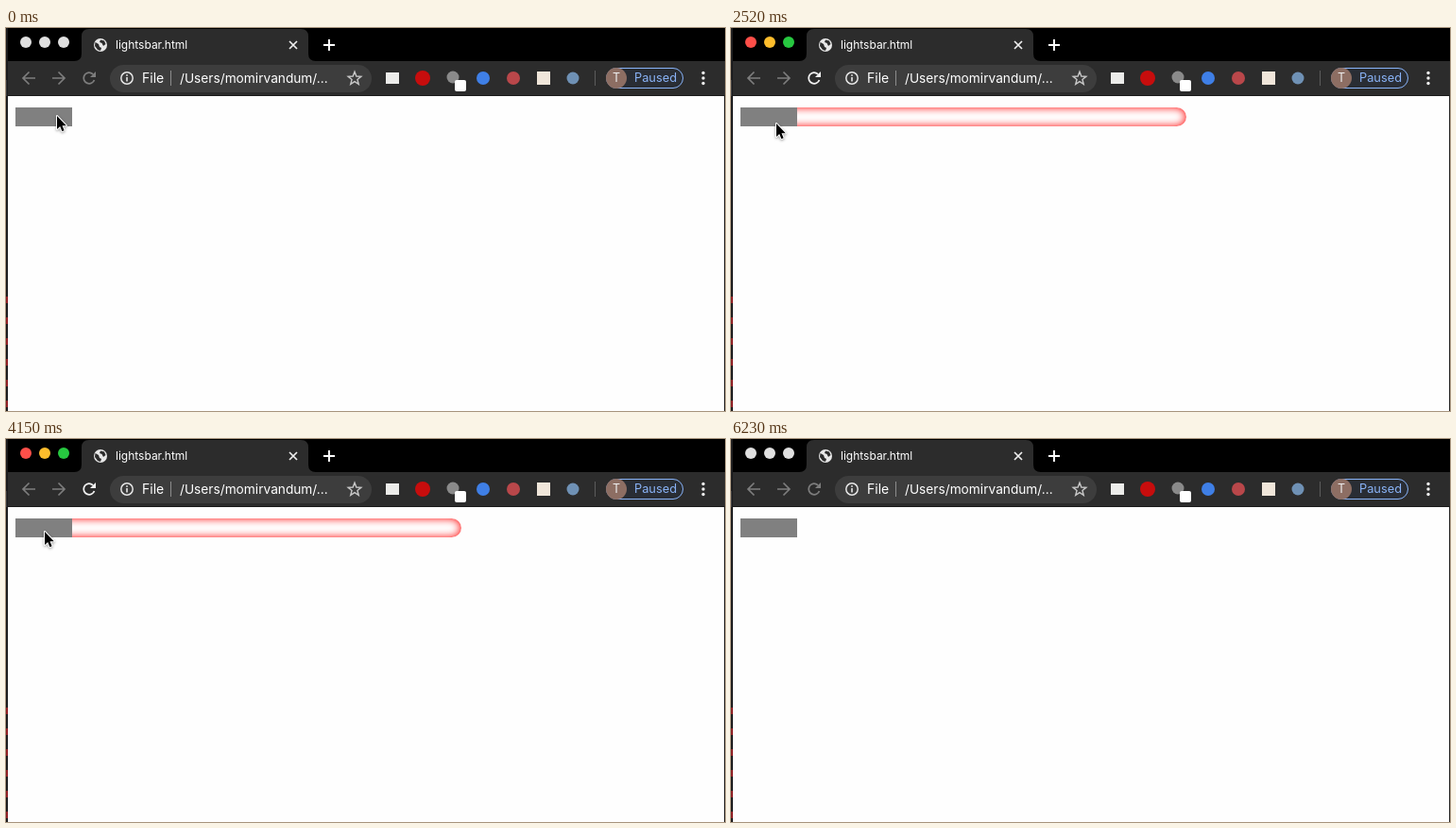
Recreate the animation shown at these times as an HTML page with a canvas. Size 761 px wide and 405 px high, loop 6330 ms.

```html
<!DOCTYPE html>
<html lang="en">
<head>
<meta charset="utf-8">
<title>lightsbar.html</title>
<style>
  html, body { margin: 0; width: 100%; height: 100%; overflow: hidden; background: #fefefe; }
  canvas { position: absolute; left: 0; top: 0; }
  span {
    position: absolute; line-height: 20px; white-space: pre; color: #fff;
    font-family: Inter, Roboto, sans-serif;
  }
  #title { left: 116px; top: 8px; font-size: 12px; }
  #scheme { left: 144px; top: 43px; font-size: 14px; }
  #path { left: 184px; top: 43px; font-size: 13.7px; }
  #avatar { left: 636px; top: 43px; width: 20px; text-align: center; font-size: 12.5px; color: #eee; }
  #status { left: 665px; top: 43px; font-size: 12.8px; color: #8ab4f8; }
</style>
</head>
<body>
<canvas id="stage" width="761" height="405"></canvas>
<span id="title">lightsbar.html</span>
<span id="scheme">File</span>
<span id="path">/Users/momirvandum/...</span>
<span id="avatar">T</span>
<span id="status">Paused</span>
<script>
const ctx = document.getElementById('stage').getContext('2d');
const LOOP = 6330, STEP = 148.15;
const FOCUS_ON = 440, FOCUS_OFF = 6230, CURSOR_GONE = 5180;
const BAR = { x: 10, y: 84, height: 20, full: 472, button: 60 };

// start time, share at start, share at end, duration
const hovers = [
  [917, 0, 1, 500], [1100, .63, 0, 315], [1482, 0, 1, 500],
  [2570, 1, 0, 500], [3640, 0, 1, 500], [4576, 1, 0, 500]
];

// step, x, y
const cursorPath = [
  [0, 54, 93], [6, 54, 93], [7, 43, 96], [8, 47, 124], [9, 58, 117], [10, 53, 98],
  [11, 50, 94], [14, 47, 96], [16, 47, 96], [17, 48, 101], [18, 58, 125],
  [19, 75, 151], [20, 83, 165], [21, 85, 169], [22, 76, 150], [23, 58, 125],
  [24, 45, 109], [25, 42, 100], [28, 41, 98], [29, 41, 98], [30, 46, 100],
  [31, 140, 130], [32, 490, 281], [33, 640, 360], [34, 698, 392]
];

function rect(x, y, w, h, color) {
  ctx.fillStyle = color;
  ctx.fillRect(x, y, w, h);
}

function pill(x, y, w, h, r, color) {
  ctx.beginPath();
  ctx.roundRect(x, y, w, h, r);
  ctx.fillStyle = color;
  ctx.fill();
}

function disc(x, y, r, color) {
  ctx.beginPath();
  ctx.arc(x, y, r, 0, Math.PI * 2);
  ctx.fillStyle = color;
  ctx.fill();
}

function ring(x, y, r, color, width, from = 0, to = Math.PI * 2) {
  ctx.beginPath();
  ctx.arc(x, y, r, from, to);
  ctx.strokeStyle = color;
  ctx.lineWidth = width;
  ctx.stroke();
}

function stroke(d, color, width) {
  ctx.strokeStyle = color;
  ctx.lineWidth = width;
  ctx.stroke(new Path2D(d));
}

function fill(d, color) {
  ctx.fillStyle = color;
  ctx.fill(new Path2D(d));
}

// CSS "ease": cubic-bezier(.25, .1, .25, 1)
function ease(x) {
  if (x <= 0 || x >= 1) return Math.min(1, Math.max(0, x));
  let lo = 0, hi = 1, s = .5;
  const bezier = (a, b) => 3 * a * s * (1 - s) ** 2 + 3 * b * s * s * (1 - s) + s ** 3;
  for (let i = 0; i < 24; i++) {
    s = (lo + hi) / 2;
    if (bezier(.25, .25) < x) lo = s; else hi = s;
  }
  return bezier(.1, 1);
}

function barShare(time) {
  const current = hovers.filter(h => h[0] <= time).pop();
  if (!current) return 0;
  const [start, from, to, duration] = current;
  return from + (to - from) * ease((time - start) / duration);
}

function cursorAt(step) {
  const next = cursorPath.findIndex(p => p[0] >= step);
  const b = cursorPath[next < 0 ? cursorPath.length - 1 : next];
  const a = cursorPath[Math.max(0, next - 1)];
  const k = b[0] > a[0] && next > 0 ? (step - a[0]) / (b[0] - a[0]) : 1;
  return [a[1] + (b[1] - a[1]) * k, a[2] + (b[2] - a[2]) * k];
}

function drawTabs(focused) {
  rect(0, 0, 761, 36, '#000');
  fill('M72 35 Q80 35 80 27 V9 Q80 1 88 1 H312 Q320 1 320 9 V27 Q320 35 328 35 Z', '#2c2c2c');
  const lights = focused ? ['#ff4f49', '#fdbd2c', '#27c840'] : Array(3).fill('#e0e0e0');
  lights.forEach((color, i) => disc(21 + 20 * i, 15, 6, color));
  disc(100, 18, 7, '#e8e8e8');
  fill('M94.5 15 L98 17 L99 20 L101 21 L100 24 L97 23 L94 19 Z', '#2c2c2c');
  fill('M100 12.5 L104 13.5 L105.5 17 L103 19 L101.5 16 L99 15 Z', '#2c2c2c');
  stroke('M300 14 L308 22 M308 14 L300 22', '#eee', 1.7);
  stroke('M336 18 H348 M342 12 V24', '#fff', 2);
}

function drawNavigation(focused) {
  rect(0, 35, 761, 37, '#2c2c2c');
  rect(0, 71, 761, 1, '#1c1c1c');
  stroke('M31 53 H18.5 M24.5 46.5 L18 53 L24.5 59.5', '#7d7d7d', 1.7);
  stroke('M49 53 H61.5 M55.5 46.5 L62 53 L55.5 59.5', '#7d7d7d', 1.7);
  const reload = focused ? '#f2f2f2' : '#7d7d7d';
  ring(88, 53, 5.8, reload, 1.8, .35, 5.5);
  fill('M95 46 V52 H89 Z', reload);

  pill(110, 39, 277, 29, 14.5, '#3d3d3d');
  ring(128, 53, 6.2, '#e6e6e6', 1.5);
  rect(127.2, 52, 1.6, 4.5, '#e6e6e6');
  rect(127.2, 49.2, 1.6, 1.6, '#e6e6e6');
  rect(174, 45, 1, 16, '#8c8c8c');
  let star = '';
  for (let i = 0; i < 10; i++) {
    const r = i % 2 ? 3.1 : 7.2, a = i * Math.PI / 5;
    star += `${i ? 'L' : 'M'}${369 + r * Math.sin(a)} ${53.5 - r * Math.cos(a)} `;
  }
  stroke(star + 'Z', '#c8c8c8', 1.4);
}

function drawExtensions() {
  rect(402, 47, 14, 12, '#ececea');
  disc(441, 53, 8, '#c70d0d');
  disc(473, 52, 6.5, '#8a8a8a');
  pill(475, 55, 12, 12, 2, '#fff');
  disc(505, 53, 7, '#3f7fe6');
  disc(537, 53, 7, '#b9474a');
  rect(562, 46, 14, 14, '#f0e6da');
  disc(600, 53, 6.5, '#6f91b5');
  rect(623, 45, 1, 16, '#5c5c5c');

  pill(635, 42, 82, 22, 11, '#292d34');
  ctx.strokeStyle = '#8ab4f8';
  ctx.lineWidth = 1;
  ctx.beginPath();
  ctx.roundRect(635.5, 42.5, 81, 21, 10.5);
  ctx.stroke();
  disc(646, 53, 11, '#8d6e63');
  [47.5, 53, 58.5].forEach(y => disc(738, y, 1.7, '#eee'));
}

function drawEdges() {
  rect(0, 0, 2, 405, '#1b1b1d');
  rect(0, 55, 1, 17, '#3a3a3c');
  for (let y = 284; y < 405; y += 22) rect(0, y, 2, 7, '#8f1f24');
  rect(760, 72, 1, 333, '#2a2a2a');
}

function drawBar(share) {
  const { x, y, height, full, button } = BAR;
  const width = full * share;
  if (width > button) {
    ctx.save();
    ctx.beginPath();
    ctx.roundRect(x, y, width, height, [0, 10, 10, 0]);
    ctx.clip();
    rect(x, y, width, height, '#fff');
    // A frame around the bar casts its glow inwards.
    ctx.shadowColor = '#f00';
    ctx.shadowBlur = 10;
    ctx.beginPath();
    ctx.rect(x - 40, y - 40, width + 80, height + 80);
    ctx.roundRect(x, y, width, height, [0, 10, 10, 0]);
    ctx.fillStyle = '#fefefe';
    ctx.fill('evenodd');
    ctx.restore();
  }
  rect(x, y, button, height, '#808080');
}

function drawCursor(x, y) {
  const arrow = new Path2D('M0 0 V14 L3.2 11.1 L5.4 16.2 L7.6 15.2 L5.5 10.3 H9.8 Z');
  ctx.save();
  ctx.translate(x, y);
  ctx.lineJoin = 'round';
  ctx.shadowColor = 'rgba(0,0,0,.4)';
  ctx.shadowBlur = 3;
  ctx.shadowOffsetY = 1;
  ctx.strokeStyle = '#fff';
  ctx.lineWidth = 2;
  ctx.stroke(arrow);
  ctx.shadowColor = 'transparent';
  ctx.fillStyle = '#000';
  ctx.fill(arrow);
  ctx.restore();
}

function draw(now) {
  const time = now % LOOP;
  const step = Math.floor((time + 10) / STEP);
  const focused = time >= FOCUS_ON && time < FOCUS_OFF;
  rect(0, 0, 761, 405, '#fefefe');
  drawTabs(focused);
  drawNavigation(focused);
  drawExtensions();
  drawEdges();
  drawBar(barShare(step * STEP));
  if (time < CURSOR_GONE) drawCursor(...cursorAt(step));
  requestAnimationFrame(() => draw(performance.now()));
}

draw(0);
</script>
</body>
</html>
```
